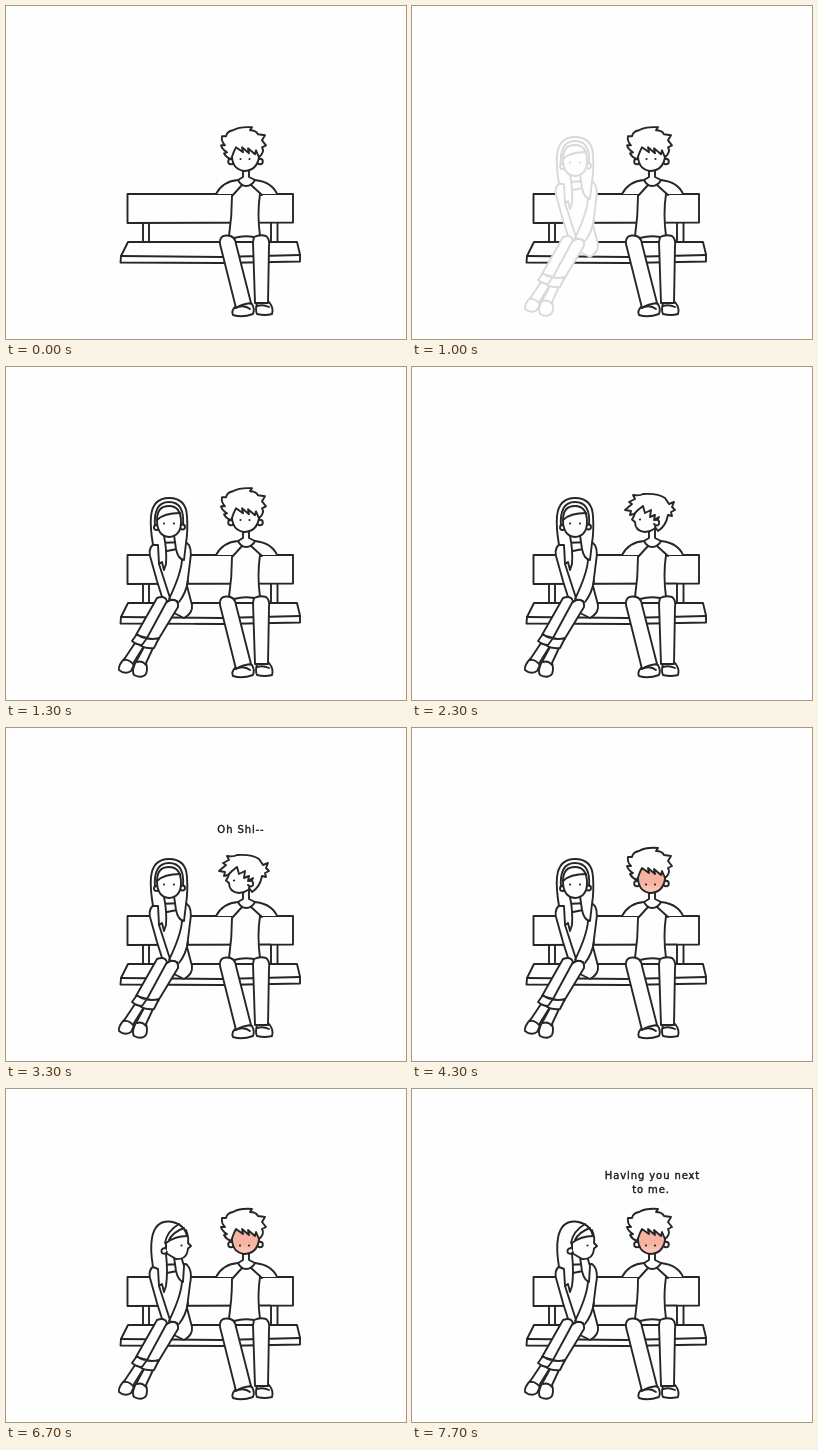
Recreate the animation shown at these times as an HTML page. Size 400 px wide and 333 px high, loop 8000 ms.

```html
<!DOCTYPE html>
<html lang="en">
<head>
<meta charset="utf-8">
<title>Two on a bench</title>
<style>
  html, body { margin: 0; width: 100%; height: 100%; overflow: hidden; background: #fefefe; }
  svg { display: block; width: 100%; height: 100%; color: #262626; }
  path, circle { fill: #fefefe; stroke: currentColor; stroke-width: 1.9; stroke-linecap: round; stroke-linejoin: round; }
  .line { fill: none; }
  .eye { fill: currentColor; stroke: none; }
  #blush .face { fill: url(#flush); }
  text { font: 10px "DejaVu Sans", sans-serif; letter-spacing: .9px; text-anchor: middle; fill: #1c1c1c; stroke: #1c1c1c; stroke-width: .4; }
  [data-show] { visibility: hidden; }
</style>
</head>
<body>
<svg viewBox="0 0 400 333">
  <defs>
    <linearGradient id="flush" x1="0" y1="0" x2="0" y2="1">
      <stop offset=".6" stop-color="#f7b3a2"/>
      <stop offset="1" stop-color="#fbd0c4"/>
    </linearGradient>
    <g id="ears">
      <circle cx="225" cy="155.500" r="2.800"/><circle cx="254" cy="155.500" r="2.800"/>
    </g>
    <path id="face" class="face" d="M226 141V151Q227 164 239 165Q251 164 253 151V141Z"/>
    <path id="hair" d="M225 152Q220 150 218 146L221 145Q216 142 215 138L219 138Q215 134 216 129L220 129Q221 124 227 123Q234 119 246 120L244 123Q250 123 252 127L259 128L256 133L260 138L256 140Q259 145 253 150L250 143L249 147L242 141L243 146L236 140L237 145L230 140L228 144Z"/>
  </defs>

  <g id="bench">
    <path d="M137 217V236M143 217V236M265 217V236M271.500 217V236"/>
    <path d="M121.500 188L287 188V216.500L121.500 217Z"/>
    <path d="M122 236L291 236L294 248.500V255.500L215 257L114.500 256.500L115 250Z"/>
    <path class="line" d="M115 250L215 251L294 249"/>
  </g>

  <g id="boy">
    <path d="M210 188Q217 175 232 174L237 171V162H243V171L249 174Q266 176 271 188" />
    <path d="M222 231Q226 210 226 190L236 179H245L254 189Q251 208 255 231" stroke="none" style="stroke:none"/>
    <path class="line" d="M223 230Q226 210 226 190L236 179M245 179L256 189M254 188Q251 208 254 230M232 174Q235 180 240 180Q246 180 249 174"/>
    <path d="M229 301Q225 305 227 309Q236 312 247 308Q249 303 246 298L240 296Z"/>
    <path d="M251 297Q249 304 251 308Q259 310 266 308Q268 302 263 296Z"/>
    <path d="M248 231Q254 228 260 230Q264 233 263 240L262 297H249L247 236Z"/>
    <path d="M214 238Q213 230 220 229.500Q229 229 230 238L245 297Q236 298 230 302Z"/>
    <path class="line" d="M228 232Q238 229 248 231M229 302Q238 298 244 303M251 300Q257 298 263 301"/>
  </g>

  <g id="plain" data-show="0-2300">
    <use href="#ears"/><use href="#face"/><use href="#hair" y="1.300"/>
    <circle class="eye" cx="234.500" cy="153" r="1.100"/><circle class="eye" cx="243.500" cy="153" r="1.100"/>
  </g>

  <g id="turned" data-show="2300-4300">
    <path class="face" d="M224 143L222 149L220 152.500L223 155Q223 164 233 165Q245 164 248 153V138H226Z"/>
    <path d="M222 147L218 148L219 144L213 143L220 137L217 135L223 132L221 128Q228 129 231 127Q246 126 253 131L257 137L262 135L260 140L263 143L259 145L260 149L256 148Q254 159 246 164L243 160L245 154L247 150L242 153L243 148L238 150L239 143L233 146L231 139L226 143Z"/>
    <path d="M243 153Q248 152 247 157Q245 160 242 157"/>
    <circle class="eye" cx="228" cy="152.500" r="1.100"/>
  </g>

  <g id="blush" data-show="4300-8000">
    <use href="#ears"/>
    <path class="face" d="M226 141V151Q227 164 239 165Q251 164 253 151V141Z"/>
    <use href="#hair"/>
    <circle class="eye" cx="234" cy="156.500" r="1.100"/><circle class="eye" cx="243" cy="156.500" r="1.100"/>
  </g>

  <g id="girl" data-show="1000-8000">
    <path d="M150 176Q142 179 144 189L151 214L157 233L168 246L178 251Q187 246 186 238L181 219L184 195Q187 180 180 175Z"/>
    <path class="line" d="M153 197L164 231M176 193Q175 207 163 232M182 214Q180 226 173 235M161 184L171 182"/>
    <path d="M129 276L119 291Q112 298 113 303Q119 308 125 304Q128 300 128 295L138 279Z"/>
    <path d="M138 280L131 293Q125 303 128 308Q136 312 140 307Q142 302 140 296L147 281Z"/>
    <path d="M165 233Q173 232 172 240L152 273L139 271L159 236Z"/>
    <path d="M151 231Q159 228 161 234L141 271L130 268Z"/>
    <path d="M139 271L135 279Q141 282 148 281L153 271Q146 273 139 271Z"/>
    <path d="M131 267L126 274Q131 278 136 278L141 271Q135 271 131 267Z"/>
    <path class="line" d="M161 235Q164 231 171 234M118 293Q123 292 127 297M131 295Q136 293 140 298"/>

    <g data-show="1000-6700">
      <path d="M147 178Q144 160 145 149Q147 131 163 131Q180 131 181 149Q182 164 180 176L178 193Q172 192 170 182L168 168L158 169Q161 183 160 197L158 203L156 195L153 197L152 178Z"/>
      <path class="line" d="M149 160Q147 135 163 135Q179 135 177 159"/>
      <circle cx="150.500" cy="160.500" r="2.500"/><circle cx="176.500" cy="160" r="2.500"/>
      <path d="M151 153Q151 139 163 139Q175 139 175 155Q175 169 163 170Q151 169 151 153Z"/>
      <path class="line" d="M151 153Q158 146 174 146"/>
      <circle class="eye" cx="158" cy="156.500" r="1.100"/><circle class="eye" cx="168" cy="156.500" r="1.100"/>
    </g>

    <g data-show="6700-8000">
      <path d="M168 168L170 182Q172 191 177 193L178 177L175 167Z"/>
      <path d="M160 149L180 141Q183 148 182 154L185 157L182 159.500Q181 171 170 170L160 164Z"/>
      <path d="M147 178Q144 160 146 149Q149 132 163 132.500Q178 134 181 147Q169 147 160 154V165Q162 183 160 197L158 203L156 195L153 197L152 180Z"/>
      <path class="line" d="M159 154Q161 142 173 135M163 151Q167 143 178 139"/>
      <path d="M159 159Q154 160 156 164Q159 166 161 163"/>
      <circle class="eye" cx="175.500" cy="156.500" r="1.100"/>
    </g>
  </g>

  <text data-show="3300-4300" x="235" y="105">Oh Shi--</text>
  <g data-show="5200-6700">
    <text x="238.500" y="89">This feels</text>
    <text x="238.500" y="100.500">like a fantasy.</text>
  </g>
  <g data-show="7700-8000">
    <text x="240.500" y="89.500">Having you next</text>
    <text x="239" y="103.500">to me.</text>
  </g>
</svg>
<script>
  const LOOP = 8000;
  const girl = document.getElementById('girl');
  const parts = [...document.querySelectorAll('[data-show]')].map(el => {
    const [from, to] = el.dataset.show.split('-').map(Number);
    return { el, from, to };
  });
  const fadeGreys = [217, 160, 95, 38];

  function draw(now) {
    const t = now % LOOP;
    for (const { el, from, to } of parts) {
      el.style.visibility = t >= from && t < to ? 'visible' : 'hidden';
    }
    const step = Math.min(3, Math.max(0, Math.floor((t - 1000) / 100)));
    const grey = fadeGreys[step];
    girl.style.color = `rgb(${grey}, ${grey}, ${grey})`;
  }

  const start = performance.now();
  function tick() {
    draw(performance.now() - start);
    requestAnimationFrame(tick);
  }
  tick();
</script>
</body>
</html>
```
